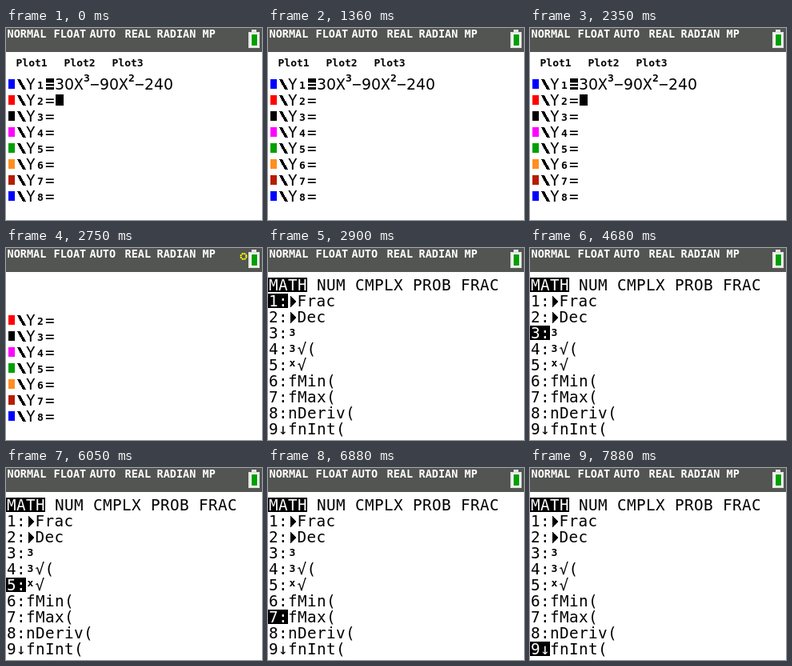
Recreate the animation shown at these times as an HTML page. Size 320x240 px, loop 8 s.

```html
<!DOCTYPE html>
<html lang="en">
<head>
<meta charset="utf-8">
<title>Calculator screen</title>
<style>
  html, body { margin: 0; width: 100%; height: 100%; overflow: hidden; background: #fff; }
  svg { display: block; width: 100%; height: 100%; }
  rect, polygon { shape-rendering: crispEdges; }
  text { white-space: pre; fill: #000; font-family: "DejaVu Sans Mono", monospace; }
  .big { font-size: 19.3px; letter-spacing: .38px; }
  .num { font: 18.86px "DejaVu Sans", sans-serif; }
  .small { font-size: 13px; font-weight: bold; }
  .status { font-size: 13.5px; font-weight: bold; fill: #fff; }
  .inv { fill: #fff; }
</style>
</head>
<body>
<svg id="stage" viewBox="0 0 320 240"></svg>
<script>
const LOOP = 8000;
const stage = document.getElementById('stage');

function add(parent, tag, attrs, str) {
  const el = document.createElementNS('http://www.w3.org/2000/svg', tag);
  for (const k in attrs) el.setAttribute(k, attrs[k]);
  if (str) el.textContent = str;
  parent.append(el);
  return el;
}
const group = () => add(stage, 'g', {});
const box = (p, x, y, width, height, fill = '#000') =>
  add(p, 'rect', { x, y, width, height, fill });
const put = (p, x, y, str, cls = 'big') => add(p, 'text', { x, y, class: cls }, str);
const show = (el, on) => { el.style.display = on ? '' : 'none'; };

// Equation editor
const editor = group();
['Plot1', 'Plot2', 'Plot3'].forEach((s, i) => put(editor, 12.5 + 60 * i, 48, s, 'small'));
box(editor, 50, 63, 10, 14);
const colors = ['#00f', '#f00', '#000', '#f0f', '#009f00', '#ff8f20', '#b61d00', '#00f'];
colors.forEach((color, i) => {
  const y = 77 + 20 * i;
  box(editor, 3, y - 13, 8, 12, color);
  add(editor, 'polygon', { points: `14,${y - 13} 18,${y - 13} 25,${y} 21,${y}` });
  put(editor, 25, y, 'Y');
  put(editor, 39, y - 1, String(i + 1), 'small');
  put(editor, 49, y, '=', i ? 'big' : 'big inv');
});
[[61, '30', 'num'], [85, 'X'], [105, '−'], [117, '90', 'num'], [141, 'X'],
 [161, '−'], [173, '240', 'num']].forEach(([x, s, cls]) => put(editor, x, 77, s, cls));
put(editor, 97, 67, '3', 'small');
put(editor, 153, 67, '2', 'small');
const cursor = box(editor, 62, 83, 10, 14);
const wipe = box(stage, 0, 30, 320, 0, '#fff');

// Math menu
const menu = group();
box(menu, 0, 37, 49, 18);
put(menu, 1, 53, 'MATH', 'big inv');
[[61, 'NUM'], [109, 'CMPLX'], [181, 'PROB'], [241, 'FRAC']]
  .forEach(([x, s]) => put(menu, x, 53, s));

// label, small leading sign, remaining text
const items = [['1:', '▶', 'Frac'], ['2:', '▶', 'Dec'], ['3:', '3', ''], ['4:', '3', '√('],
  ['5:', 'x', '√'], ['6:', '', 'fMin('], ['7:', '', 'fMax('], ['8:', '', 'nDeriv('],
  ['9↓', '', 'fnInt(']];
const rows = items.map(([label, sign, rest], i) => {
  const g = add(menu, 'g', {}), y = 73 + 20 * i;
  const bar = box(g, 0, y - 16, 25, 18);
  const tag = put(g, 1, y, label);
  if (sign === '▶') {
    add(g, 'polygon', { points: `28,${y - 13} 35,${y - 6} 28,${y + 1}` });
  } else if (sign) {
    put(g, 26.5, y - (sign === 'x' ? 5 : 3), sign, 'small');
  }
  put(g, sign ? 36.5 : 25, y, rest);
  return { g, bar, tag };
});

// Status bar
const top0 = group();
box(top0, 0, 0, 320, 30, '#525552');
[[1.5, 'NORMAL'], [59.5, 'FLOAT'], [104.5, 'AUTO'], [148.5, 'REAL'], [188.5, 'RADIAN'], [245.5, 'MP']]
  .forEach(([x, s]) => put(top0, x, 12, s, 'status'));
box(top0, 307, 2, 6, 3, '#e6e6e6');
box(top0, 303, 5, 14, 20, '#e6e6e6');
box(top0, 305, 7, 10, 16, '#fff');
box(top0, 307, 8, 7, 14, '#009f00');
const busy = add(top0, 'circle', {
  cx: 297, cy: 10.5, r: 3.5, fill: 'none', stroke: '#ff0', 'stroke-width': 2, 'stroke-dasharray': '2 .75'
});

// Each table holds [start time, value]
const blinks = [0, 60, 370, 710, 1050, 1360, 1700, 2040, 2350, 2690].map((t, i) => [t, i % 2 === 0]);
const wipes = [[0, 30], [2720, 55], [2750, 80], [2780, 130], [2810, 185], [2840, 240]];
const shown = [[0, -1], [2840, 0], [2870, 5], [2900, 9]];
const picks = [[0, 1], [4250, 0], [4280, 2], [4650, 0], [4680, 3], [5300, 0], [5330, 4],
  [6050, 5], [6450, 6], [6850, 0], [6880, 7], [7410, 0], [7440, 8], [7880, 9]];
const waits = [[2690, 2900], [4650, 4680], [6850, 6880], [7410, 7440]];

const at = (table, t) => table.filter(step => step[0] <= t).pop()[1];

function draw(t) {
  const count = at(shown, t), pick = at(picks, t);
  show(cursor, at(blinks, t));
  show(editor, count < 0);
  wipe.setAttribute('height', at(wipes, t) - 30);
  show(menu, count >= 0);
  rows.forEach(({ g, bar, tag }, i) => {
    const on = pick === i + 1;
    show(g, i < count);
    show(bar, on);
    tag.setAttribute('class', on ? 'big inv' : 'big');
  });
  show(busy, waits.some(([a, b]) => t >= a && t < b));
}

const start = performance.now();
function tick() {
  draw((performance.now() - start) % LOOP);
  requestAnimationFrame(tick);
}
tick();
</script>
</body>
</html>
```
